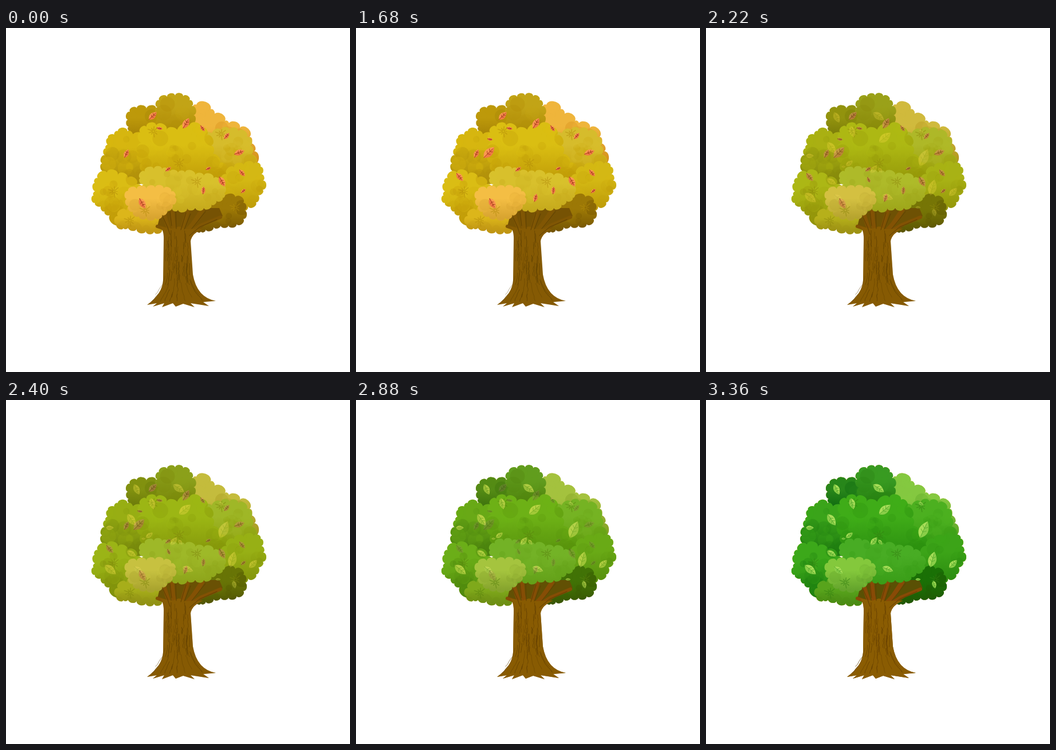
Animation of 600 by 600 pixels, one loop 3.99 s. Source, as an HTML page with a canvas:

```html
<!DOCTYPE html>
<html lang="en">
<head>
<meta charset="utf-8">
<title>Tree through the seasons</title>
<style>
html, body { margin: 0; width: 100%; height: 100%; overflow: hidden; background: #fff; }
canvas { display: block; width: 100%; height: 100%; }
</style>
</head>
<body>
<canvas id="stage" width="600" height="600"></canvas>
<script>
const LOOP = 3990, STEP = 30, FADE_FROM = 1770, FADE_TO = 3360;
const AUTUMN = 0, SUMMER = 1;
const ctx = document.getElementById('stage').getContext('2d');

// Each clump: notch points clockwise, [light, dark] in autumn, [light, dark] in summer.
const back = [
  [[326,142, 332,134, 357,142, 362,152, 382,162, 388,168, 408,174, 425,190, 425,202, 433,215, 432,238, 400,240, 350,190, 325,165],
    ['#efb53c', '#d28d1a'], ['#84c840', '#5ca428']],
  [[215,172, 213,160, 216,146, 228,140, 245,142, 262,140, 275,160, 262,185, 225,188, 214,178],
    ['#bd990a', '#a78306'], ['#28861a', '#0f6a10']],
  [[268,152, 264,138, 267,126, 281,120, 295,118, 309,119, 320,126, 324,136, 327,152, 322,168, 300,176, 275,172],
    ['#c2a416', '#b18e08'], ['#389a22', '#288212']],
  [[172,250, 168,236, 174,222, 174,210, 181,204, 178,192, 190,188, 195,180, 212,180, 220,190, 240,188, 250,215, 255,250, 215,262],
    ['#d6b60f', '#b0900a'], ['#3aa41a', '#1f7c10']],
  [[335,205, 345,185, 360,188, 375,178, 390,178, 405,180, 420,190, 426,205, 424,222, 436,236, 420,250, 380,252, 350,235],
    ['#d6bc2c', '#c6a40c'], ['#4cb020', '#389c14']],
  [[238,235, 232,218, 240,200, 234,182, 245,172, 262,170, 280,178, 300,184, 320,170, 340,174, 350,187, 358,205, 355,222, 372,236, 384,250, 360,268, 300,262, 255,262, 240,250],
    ['#dabe12', '#c09c08'], ['#3fac18', '#2c9010']],
  [[385,255, 398,243, 415,240, 432,237, 444,242, 444,255, 448,266, 448,282, 437,290, 436,304, 422,311, 405,316, 385,300, 378,275],
    ['#d4b814', '#be9b08'], ['#3ca418', '#2c8c10']],
  [[158,285, 155,270, 160,262, 176,252, 195,256, 212,262, 228,272, 232,300, 220,330, 200,342, 182,325, 172,320, 168,308, 155,305, 153,292],
    ['#dabd14', '#c09a08'], ['#3ca81a', '#1e8010']],
  [[193,342, 195,328, 210,318, 250,325, 275,330, 272,352, 258,355, 244,354, 228,350, 213,346, 205,349],
    ['#dcb61a', '#c09614'], ['#58a41c', '#4a8c14']],
  [[335,325, 350,305, 380,298, 400,295, 414,305, 415,318, 414,333, 402,342, 388,344, 374,343, 362,347, 348,351, 340,355, 332,352],
    ['#9c7806', '#745402'], ['#1a7006', '#205804']]
];
const front = [
  [[240,272, 234,262, 242,250, 258,246, 272,246, 285,252, 300,254, 312,252, 330,258, 345,258, 362,262, 374,272, 380,288, 378,296, 366,300, 358,308, 345,314, 330,312, 316,314, 300,317, 290,315, 265,300],
    ['#d8c02c', '#c6aa1c'], ['#48ac24', '#3a9e18']],
  [[214,310, 211,298, 213,284, 228,281, 245,281, 260,279, 275,280, 288,285, 294,295, 290,308, 280,316, 272,326, 260,331, 245,330, 232,328, 222,320],
    ['#f4be44', '#d8a430'], ['#84c83c', '#64a42c']]
];
const tufts = [257,180, 302,236, 333,268, 400,313, 216,336, 243,318, 188,285, 375,185];

// Leaves: x, y, length, angle, and the time at which a late one appears.
const autumnLeaves = [
  [256,153,19,-45], [314,166,21,-60], [343,175,13,55], [268,175,11,10], [385,188,14,-50],
  [407,217,19,-20], [210,219,16,-65], [283,246,12,-35], [353,245,10,-25], [412,253,15,50],
  [377,268,20,60], [414,284,11,-40], [344,283,14,-85], [238,306,21,60],
  [232,217,26,-45,720], [181,260,18,50,750], [313,296,15,-75,810], [234,194,10,10,1680], [284,265,11,65,1830]
];
const summerLeaves = [
  [228,156,20,65], [301,154,23,35], [312,191,26,-40], [255,181,20,75], [219,209,24,55],
  [181,223,14,0], [250,236,15,-35], [240,242,7,0], [293,246,17,-50], [304,248,11,50],
  [219,268,18,30], [182,296,25,40], [231,297,19,40], [317,295,20,20], [380,226,32,-65],
  [375,181,10,30], [395,278,28,-75], [431,286,19,-45], [370,313,9,0], [398,322,14,75]
];

let seed;
function rnd(a, b) {
  seed = (seed * 16807) % 2147483647;
  return a + (b - a) * seed / 2147483647;
}

function cloud(p) {
  const path = new Path2D();
  path.moveTo(p[0], p[1]);
  for (let i = 0; i < p.length; i += 2) {
    const x = p[i], y = p[i + 1];
    const X = p[(i + 2) % p.length], Y = p[(i + 3) % p.length];
    const nx = (Y - y) * .5, ny = (x - X) * .5;
    path.bezierCurveTo(x + nx, y + ny, X + nx, Y + ny, X, Y);
  }
  path.closePath();
  return path;
}

function clump(g, [pts, ...tones], season) {
  const [light, dark] = tones[season];
  const xs = pts.filter((_, i) => i % 2 === 0), ys = pts.filter((_, i) => i % 2);
  const left = Math.min(...xs), right = Math.max(...xs);
  const top = Math.min(...ys), bottom = Math.max(...ys);
  const shade = g.createLinearGradient(0, top, 0, bottom);
  shade.addColorStop(.35, light);
  shade.addColorStop(1, dark);
  g.save();
  g.clip(cloud(pts));
  g.fillStyle = shade;
  g.fillRect(0, 0, 600, 600);
  // soft rounded tufts, mostly lit above and shaded below
  const count = (right - left) * (bottom - top) / 330;
  for (let i = 0; i < count; i++) {
    const y = rnd(top, bottom);
    g.globalAlpha = rnd(.15, .4);
    g.fillStyle = y < rnd(top, bottom) ? light : dark;
    g.beginPath();
    g.arc(rnd(left, right), y, rnd(5, 14), 0, 7);
    g.fill();
  }
  g.restore();
}

function line(g, pts) {
  g.beginPath();
  for (let i = 0; i < pts.length; i += 2) g.lineTo(pts[i], pts[i + 1]);
  g.stroke();
}

function trunk(g, season) {
  const bark = ['#855a04', '#8a5c02'][season], deep = ['#5e4002', '#613c02'][season];
  g.fillStyle = ['#765204', '#5a5004'][season];
  g.fill(new Path2D('M264 346L272 314H372L378 328L352 340L330 358L285 362Z'));
  g.lineCap = g.lineJoin = 'round';
  g.strokeStyle = ['#805604', '#884a06'][season];
  for (const [w, ...pts] of [
    [6, 282,362, 276,350, 264,346], [7, 288,362, 281,342, 276,326], [8, 296,362, 291,340, 289,316],
    [7, 304,362, 311,338, 318,316], [8, 308,362, 326,342, 342,318], [6, 314,360, 340,344, 374,330]
  ]) {
    g.lineWidth = w;
    line(g, pts);
  }
  g.fillStyle = bark;
  g.fill(new Path2D('M268 346Q276 352 275 372L274 440Q273 463 246 483L263 480L256 486L276 480L272 487L291 480L296 486L309 481L329 487L322 480L354 485L344 478L366 476Q333 470 326 430L322 372Q324 358 344 350Q327 350 314 351L302 346L290 350Z'));

  g.strokeStyle = deep;
  g.lineWidth = 1;
  for (const pts of [
    [274,330, 282,348, 286,360], [286,320, 289,345], [296,320, 297,350], [314,322, 305,352],
    [322,324, 311,351], [348,320, 324,350], [368,334, 338,347, 320,362]
  ]) line(g, pts);
  const spread = y => 23 + (y > 425 ? (y - 425) ** 2 / 85 : 0);
  for (let i = 0; i < 58; i++) {
    const u = rnd(-.92, .92), y = rnd(352, 465), end = Math.min(y + rnd(8, 38), 479);
    const pts = [];
    for (let v = y; v < end; v += 4) pts.push(299 + u * spread(v) + rnd(-.8, .8), v);
    g.globalAlpha = rnd(.35, .85);
    line(g, pts);
  }
  g.globalAlpha = 1;
}

function drawTufts(g, season) {
  g.strokeStyle = ['#b48c0a', '#347f12'][season];
  g.globalAlpha = .5;
  g.lineWidth = 1.6;
  for (let i = 0; i < tufts.length; i += 2)
    for (let k = 0; k < 9; k++) {
      const a = k * Math.PI / 4.5, r = 6 + k % 3 * 2;
      const c = Math.cos(a), s = Math.sin(a), x = tufts[i], y = tufts[i + 1];
      line(g, [x + c * 2, y + s * 2, x + c * r, y + s * r]);
    }
  g.globalAlpha = 1;
}

function leaf(g, [x, y, size, angle], season) {
  const [upper, lower, vein] = [['#fb9850', '#f07a46', '#a83a20'], ['#a8de58', '#8ace48', '#5cae30']][season];
  const r = size / 2, w = size * .52;
  g.save();
  g.translate(x, y);
  g.rotate(angle * Math.PI / 180);
  for (const [side, color] of [[-w, upper], [w, lower]]) {
    g.fillStyle = color;
    g.beginPath();
    g.moveTo(-r, 0);
    g.quadraticCurveTo(-r * .2, side, r, 0);
    g.fill();
  }
  g.strokeStyle = vein;
  g.lineWidth = .9;
  line(g, [-r, 0, r * .7, 0]);
  for (const v of [-.3, .15]) line(g, [(v + .25) * r, -w * .3, v * r, 0, (v + .25) * r, w * .3]);
  g.restore();
}

function tree(season) {
  const layer = document.createElement('canvas');
  layer.width = layer.height = 600;
  const g = layer.getContext('2d');
  seed = 4217;
  back.forEach(c => clump(g, c, season));
  trunk(g, season);
  front.forEach(c => clump(g, c, season));
  drawTufts(g, season);
  if (season === SUMMER) summerLeaves.forEach(l => leaf(g, l, season));
  return layer;
}

const autumn = tree(AUTUMN), summer = tree(SUMMER);

function draw() {
  const t = Math.floor(performance.now() % LOOP / STEP) * STEP;
  const fade = Math.min(1, Math.max(0, (t - FADE_FROM) / (FADE_TO - FADE_FROM)));
  ctx.globalAlpha = 1;
  ctx.fillStyle = '#fff';
  ctx.fillRect(0, 0, 600, 600);
  ctx.drawImage(autumn, 0, 0);
  for (const l of autumnLeaves) if (t >= (l[4] || 0)) leaf(ctx, l, AUTUMN);
  ctx.globalAlpha = fade;
  ctx.drawImage(summer, 0, 0);
  requestAnimationFrame(draw);
}
draw();
</script>
</body>
</html>
```
